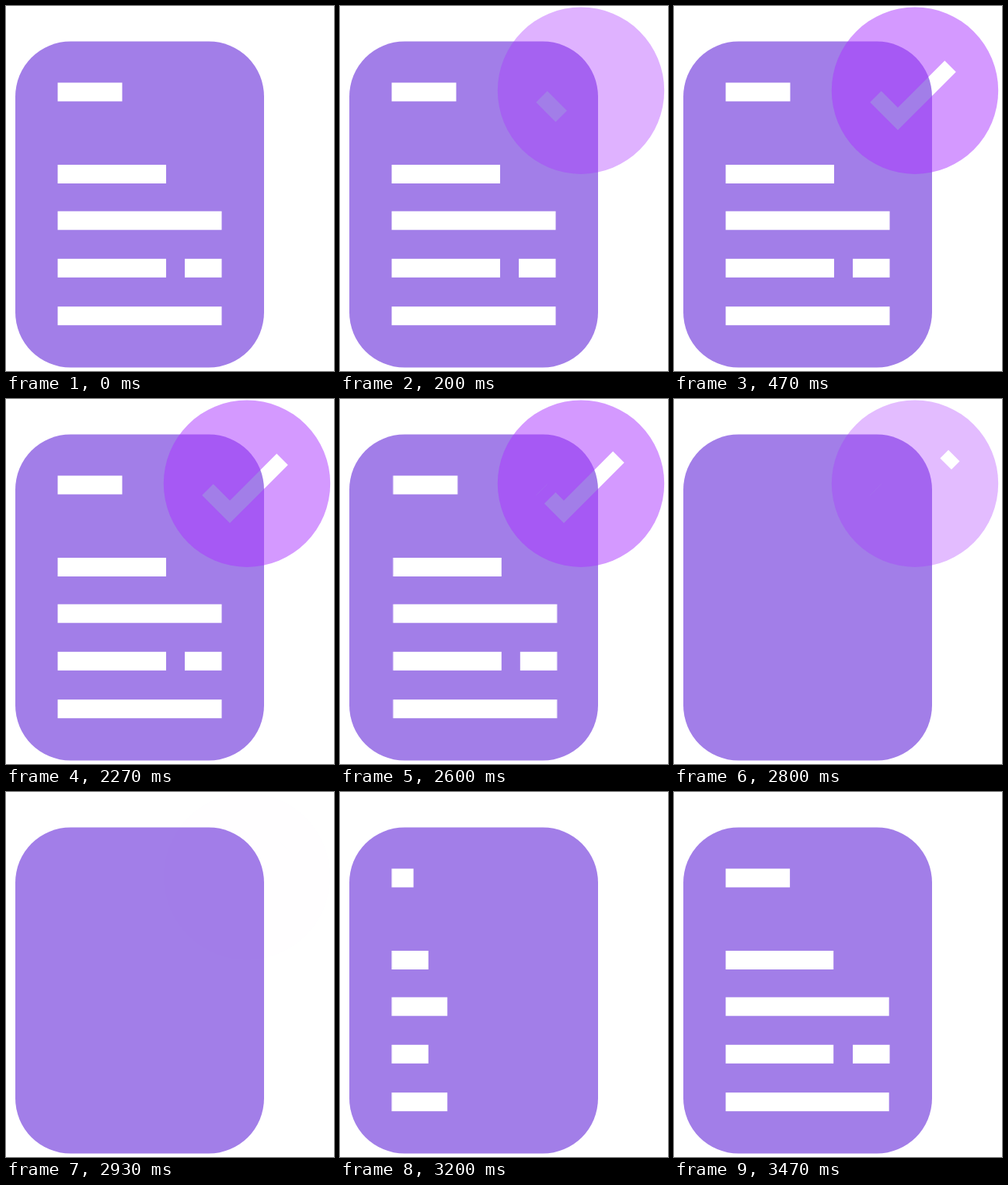
Recreate the animation shown at these times as an HTML page. Size 422 by 469 pixels, loop 3.54 s.

```html
<!DOCTYPE html>
<html lang="en">
<head>
<meta charset="utf-8">
<title>Document approved</title>
<style>
  html, body { margin: 0; width: 100%; height: 100%; overflow: hidden; background: #fff; }
  svg { display: block; width: 100%; height: 100%; }

  .badge, .draw, .erase, .lines, .lines rect {
    animation: 3540ms linear infinite;
  }
  .badge { animation-name: fade; }
  .draw { animation-name: draw; }
  .erase { animation-name: erase; }
  .lines { animation-name: slide; }
  .lines rect {
    animation-name: grow;
    transform-box: fill-box;
    transform-origin: left center;
  }
  .lines .late { animation-name: grow-late; }

  .tick { fill: none; stroke-miterlimit: 10; }
  .draw, .erase { animation-timing-function: cubic-bezier(.333, 0, .667, 1); }

  @keyframes fade {
    0% { opacity: 0; }
    7.54%, 77.2% { opacity: 1; }
    82.85%, 100% { opacity: 0; }
  }
  /* the tip of the tick pushes on a little before the tail catches up */
  @keyframes draw {
    0%, 1.89% { stroke-dasharray: 0 300; }
    13.18%, 64.04% { stroke-dasharray: 135.8 300; }
    80.98%, 100% { stroke-dasharray: 142.8 300; }
  }
  @keyframes erase {
    0%, 71.56% { stroke-dasharray: 0 300; }
    81.07%, 100% { stroke-dasharray: 143 300; }
  }
  @keyframes slide {
    0%, 64.04% { transform: translateX(0); animation-timing-function: ease-in-out; }
    73.44% { transform: translateX(1.8px); animation-timing-function: ease-in; }
    77.2%, 80% { transform: translateX(-28px); animation-timing-function: step-end; }
    82%, 100% { transform: translateX(0); }
  }
  @keyframes grow {
    0%, 73.45% { transform: scaleX(1); animation-timing-function: ease-in-out; }
    79%, 85.03% { transform: scaleX(0); animation-timing-function: cubic-bezier(.455, .03, .515, .955); }
    98.45%, 100% { transform: scaleX(1); }
  }
  @keyframes grow-late {
    0%, 73.45% { transform: scaleX(1); animation-timing-function: ease-in-out; }
    79%, 90.4% { transform: scaleX(0); animation-timing-function: ease-in-out; }
    97.9%, 100% { transform: scaleX(1); }
  }
</style>
</head>
<body>
<svg viewBox="0 0 422 469">
  <defs>
    <path id="tick" d="M259.5 116.5L288 145L360.5 72.5"/>
    <mask id="cutout" maskUnits="userSpaceOnUse" x="0" y="0" width="422" height="469">
      <rect width="422" height="469" fill="#fff"/>
      <use href="#tick" class="tick draw" stroke="#000" stroke-width="20.5"/>
      <use href="#tick" class="tick erase" stroke="#fff" stroke-width="22.5"/>
    </mask>
  </defs>

  <rect x="12" y="45.5" width="320" height="419" rx="71" fill="#a27ee8"/>

  <g class="lines" fill="#fff">
    <rect x="66.5" y="98.5" width="83" height="24"/>
    <rect x="66.5" y="204" width="139.5" height="24"/>
    <rect x="66.5" y="263.7" width="211" height="24"/>
    <rect x="66.5" y="324.8" width="139.5" height="24"/>
    <rect x="230" y="324.8" width="47.5" height="24" class="late"/>
    <rect x="66.5" y="386.2" width="211" height="24"/>
  </g>

  <g class="badge">
    <circle cx="310" cy="108.7" r="107.2" fill="#a935ff" fill-opacity=".5" mask="url(#cutout)"/>
  </g>
</svg>
<script>
  // Hold each pose for one tick of 15 per second.
  const LOOP = 3540, FPS = 15;
  const anims = document.getAnimations();
  const start = performance.now();

  function snap() {
    const t = performance.now() - start;
    const local = t % LOOP;
    const held = Math.floor(local * FPS / 1000 + 0.1) * 1000 / FPS;
    for (const a of anims) a.currentTime = t - local + Math.min(held, LOOP - 1);
    requestAnimationFrame(snap);
  }
  snap();
</script>
</body>
</html>
```
